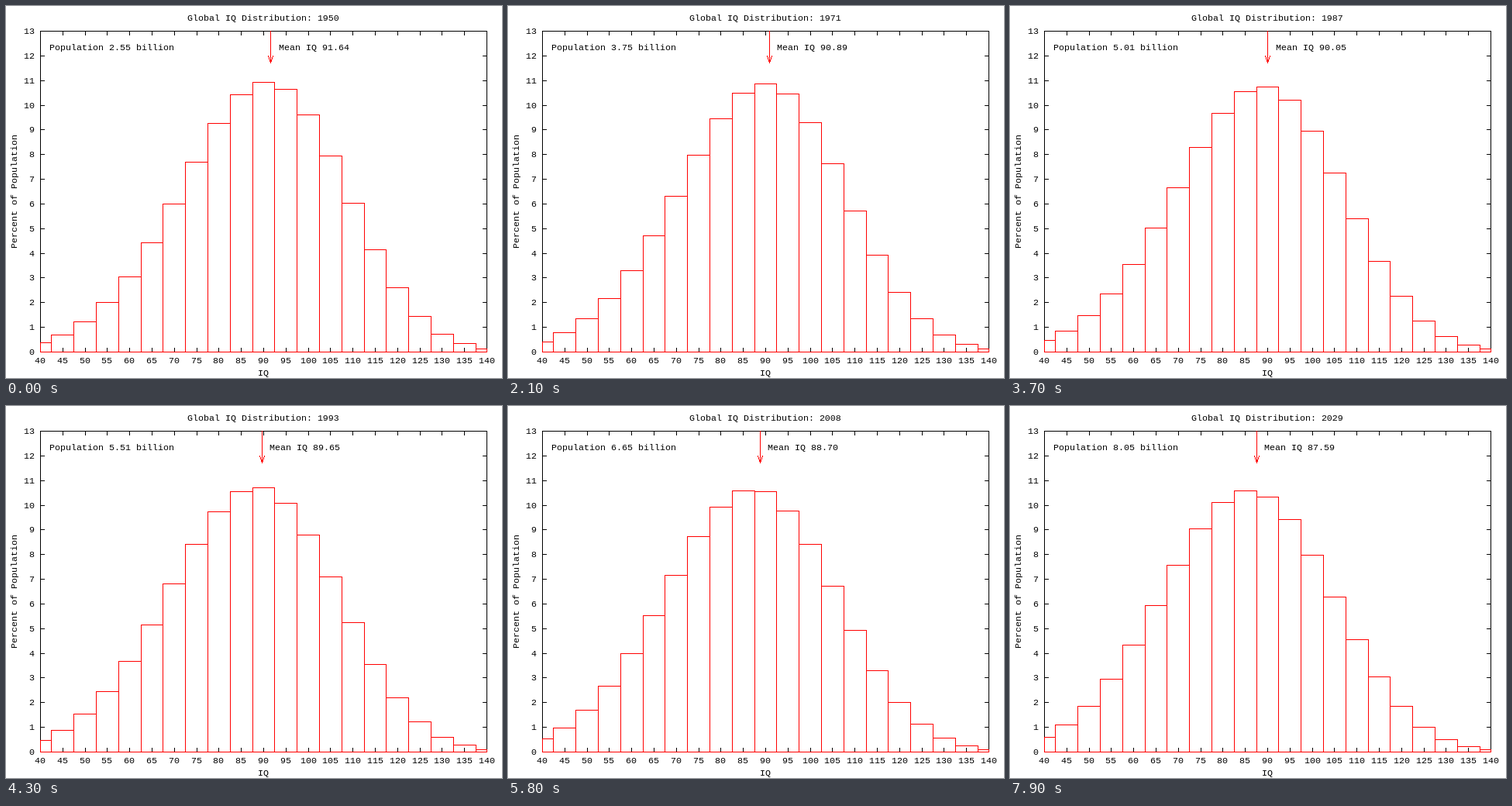
These frames come from a looping animation (640x480 px, 8 s). An HTML page with a canvas:

```html
<!DOCTYPE html>
<html lang="en">
<head>
<meta charset="utf-8">
<title>Global IQ Distribution</title>
<style>
html, body { margin: 0; width: 640px; height: 480px; overflow: hidden; background: #fff; }
canvas { display: block; }
</style>
</head>
<body>
<canvas id="stage" width="640" height="480"></canvas>
<script>
const ctx = document.getElementById('stage').getContext('2d');
const LEFT = 44, RIGHT = 620, TOP = 32, BOTTOM = 446, MID = 332;
const BLACK = '#000', RED = '#f00';
const STEP_MS = 100, STEPS = 80, FIRST_YEAR = 1950;
const MEAN_START = 91.64, MEAN_END = 87.59;

// Key points: year, mean IQ, population in billions
const knots = [
  [1950, MEAN_START, 2.55], [1960, 91.30, 3.03], [1981, 90.42, 4.52], [1993, 89.65, 5.51],
  [2008, 88.70, 6.65], [2018, 88.19, 7.37], [2029, MEAN_END, 8.05]
];

const iqX = iq => LEFT + (iq - 40) * (RIGHT - LEFT) / 100;
const pctY = p => BOTTOM - p * (BOTTOM - TOP) / 13;

// Cubic Hermite curve through the given column of the key points
function valueAt(year, col) {
  const last = knots.length - 2;
  const slope = i => (knots[i + 1][col] - knots[i][col]) / (knots[i + 1][0] - knots[i][0]);
  const tangent = i => {
    if (i === 0) return slope(0);
    if (i > last) return slope(last);
    const a = knots[i][0] - knots[i - 1][0], b = knots[i + 1][0] - knots[i][0];
    return (slope(i - 1) * b + slope(i) * a) / (a + b);
  };
  let i = 0;
  while (i < last && year >= knots[i + 1][0]) i++;
  const p = knots[i], q = knots[i + 1];
  const h = q[0] - p[0], t = (year - p[0]) / h, u = 1 - t;
  return p[col] * u * u * (1 + 2 * t) + q[col] * t * t * (3 - 2 * t)
    + h * (tangent(i) * t * u * u - tangent(i + 1) * t * t * u);
}

// Skewed bell curve: log height is a polynomial in u whose terms drift with the mean
function barHeight(iq, mean) {
  const s = (MEAN_START - mean) / (MEAN_START - MEAN_END);
  const drift = (from, to, bend = 0) => from + (to - from) * s + bend * s * (1 - s);
  const u = (iq - 90) / 5;
  const terms = [
    drift(5.853, 5.797, 0.02),
    drift(0.0122, -0.0575, -0.005),
    drift(-0.037, -0.0348),
    drift(-7.6e-4, -3.8e-4),
    drift(-1.9e-5, -3.4e-5),
    drift(1.1e-6, 0)
  ];
  return Math.exp(terms.reduceRight((sum, k) => sum * u + k, 0));
}

function hLine(x0, x1, y) {
  ctx.fillRect(Math.round(x0), Math.round(y), Math.round(x1) - Math.round(x0) + 1, 1);
}

function vLine(x, y0, y1) {
  ctx.fillRect(Math.round(x), Math.round(y0), 1, Math.round(y1) - Math.round(y0) + 1);
}

function frame(x0, y0, x1, y1) {
  hLine(x0, x1, y0);
  hLine(x0, x1, y1);
  vLine(x0, y0, y1);
  vLine(x1, y0, y1);
}

// x is the left edge of a run of 7px cells
function label(text, x, y) {
  ctx.fillText(text, Math.round(x), Math.round(y));
}

function centred(text, x, y) {
  label(text, x - text.length * 3.5, y);
}

function drawAxes() {
  frame(LEFT, TOP, RIGHT, BOTTOM);
  for (let p = 0; p <= 13; p++) {
    const y = Math.round(pctY(p)), s = String(p);
    hLine(LEFT, LEFT + 5, y);
    hLine(RIGHT - 5, RIGHT, y);
    label(s, 37 - s.length * 7, y + 4);
  }
  for (let iq = 40; iq <= 140; iq += 5) {
    const x = Math.round(iqX(iq));
    vLine(x, TOP, TOP + 5);
    vLine(x, BOTTOM - 5, BOTTOM);
    centred(String(iq), x, 461);
  }
  centred('IQ', MID, 477);
  ctx.save();
  ctx.translate(14, 240);
  ctx.rotate(-Math.PI / 2);
  centred('Percent of Population', 0, 0);
  ctx.restore();
}

function drawBars(mean) {
  for (let iq = 40; iq <= 140; iq += 5) {
    const x0 = Math.max(LEFT, iqX(iq - 2.5)), x1 = Math.min(RIGHT, iqX(iq + 2.5));
    frame(x0, BOTTOM - barHeight(iq, mean), x1, BOTTOM);
  }
}

function drawArrow(x) {
  const tip = 73;
  vLine(x, TOP, tip);
  for (let i = 0; i <= 9; i++) {
    const dx = Math.round(i / 3);
    ctx.fillRect(x - dx, tip - i, 1, 1);
    ctx.fillRect(x + dx, tip - i, 1, 1);
  }
}

function draw(step) {
  const year = FIRST_YEAR + step;
  const mean = valueAt(year, 1), pop = valueAt(year, 2);
  const meanX = iqX(mean);

  ctx.fillStyle = '#fff';
  ctx.fillRect(0, 0, 640, 480);
  ctx.font = '11.667px "Liberation Mono", monospace';
  ctx.fillStyle = BLACK;
  drawAxes();
  centred(`Global IQ Distribution: ${year}`, MID, 19);
  label(`Population ${pop.toFixed(2)} billion`, 56, 57);
  label(`Mean IQ ${mean.toFixed(2)}`, meanX + 10.3, 57);

  ctx.fillStyle = RED;
  drawBars(mean);
  drawArrow(Math.round(meanX + 0.05));
}

function tick() {
  draw(Math.floor(performance.now() / STEP_MS) % STEPS);
  requestAnimationFrame(tick);
}
tick();
</script>
</body>
</html>
```
